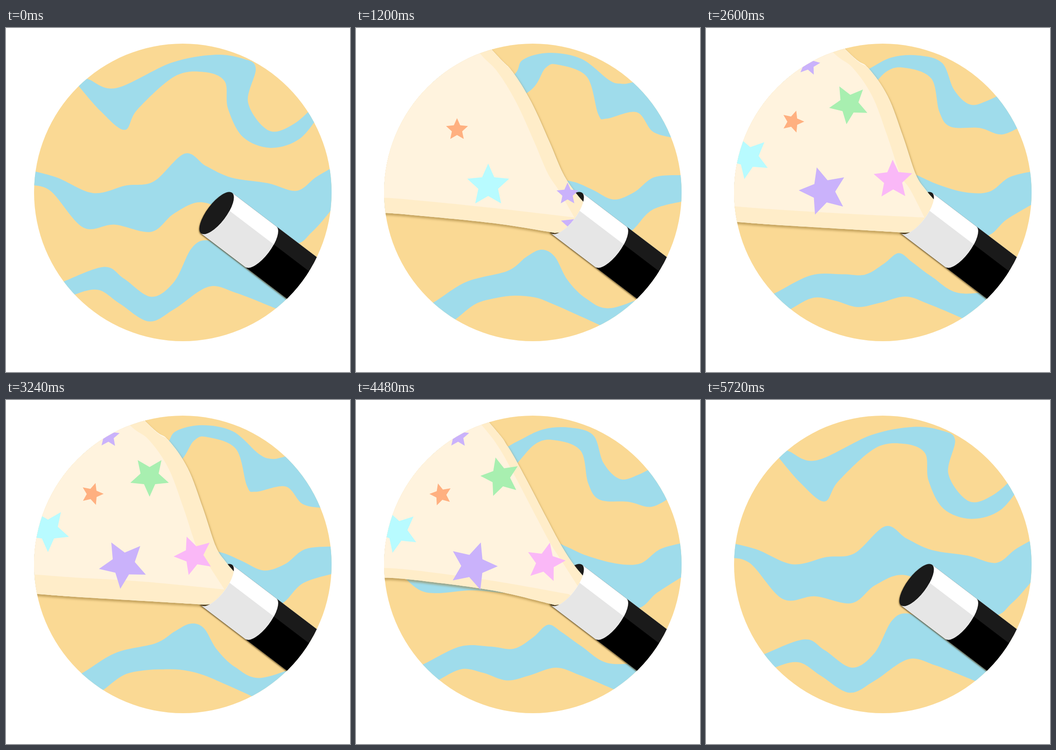
Animation, 748 px wide and 748 px high, one loop 5760 ms. Source, as an HTML page with a canvas:

```html
<!DOCTYPE html>
<html lang="en">
<head>
<meta charset="utf-8">
<title>Magic wand</title>
<style>
html, body { margin: 0; height: 100%; overflow: hidden; background: #fff; }
canvas { display: block; }
</style>
</head>
<body>
<canvas id="stage" width="748" height="748"></canvas>
<script>
const ctx = document.getElementById('stage').getContext('2d');
const LOOP = 5760, WAVE = 1920, STEP = 40;

const clamp = u => Math.min(1, Math.max(0, u));
const ease = u => { u = clamp(u); return u * u * (3 - 2 * u); };
const mix = (a, b, u) => a + (b - a) * u;
const mixPoint = (p, q, u) => p.map((v, i) => mix(v, q[i], u));
const mixPoints = (a, b, u) => a.map((p, i) => mixPoint(p, b[i], u));
const points = text => text.split(' ').map(p => p.split(',').map(Number));

// Eases one value through [time, value] keys.
function track(keys, t) {
  let value = keys[0][1];
  for (let i = 1; i < keys.length; i++) {
    const [from] = keys[i - 1], [to, next] = keys[i];
    value = mix(value, next, ease((t - from) / (to - from)));
  }
  return value;
}

// Adds a smooth curve through the points to the path.
function curve(path, pts, join) {
  path[join ? 'lineTo' : 'moveTo'](...pts[0]);
  for (let i = 0; i < pts.length - 1; i++) {
    const p = pts[i - 1] || pts[i], q = pts[i], r = pts[i + 1], s = pts[i + 2] || r;
    path.bezierCurveTo(q[0] + (r[0] - p[0]) / 6, q[1] + (r[1] - p[1]) / 6,
      r[0] - (s[0] - q[0]) / 6, r[1] - (s[1] - q[1]) / 6, ...r);
  }
}

// Rivers swing between two poses; each bank is a pair of curves.
const bank = (a, b) => [points(a), points(b)];
const rivers = [
  [bank('150,98 180,112 240,130 360,75 455,58 517,67 544,88 526,163 572,225 628,209 680,160',
        '150,55 190,102 245,160 340,105 363,69 420,54 490,67 550,113 575,121 602,118 680,95'),
   bank('150,117 205,180 258,222 284,178 365,106 430,96 475,116 482,175 515,238 575,262 640,240 690,175',
        '150,80 190,165 240,195 372,141 412,87 440,80 502,106 527,188 545,197 610,183 645,225 690,239')],
  [bank('40,306 110,325 190,360 260,343 320,334 388,272 435,300 490,325 570,337 632,354 675,324 720,297',
        '40,347 90,316 150,299 290,310 380,322 430,328 475,335 515,352 560,373 605,357 650,324 720,320'),
   bank('40,341 95,352 168,434 235,428 315,444 365,403 425,378 500,410 620,468 667,443 720,380',
        '40,395 85,398 135,403 270,400 350,395 425,400 500,430 560,450 600,440 645,395 720,375')],
  [bank('90,567 126,550 213,519 255,545 315,586 365,553 402,480 435,460 480,480 550,535 660,560',
        '130,612 168,597 240,552 330,528 370,498 403,482 432,497 460,548 500,588 555,609 660,570'),
   bank('120,598 150,578 200,569 247,600 310,639 365,612 440,562 500,575 587,609 650,635',
        '180,660 217,633 260,600 305,587 345,582 390,586 430,601 475,621 530,646 600,680')]
];

function drawRivers(t) {
  const p = (t - 60 + WAVE) % WAVE, rise = 1140;
  const swing = ease(p < rise ? p / rise : (WAVE - p) / (WAVE - rise));
  ctx.fillStyle = '#9fdceb';
  for (const [upper, lower] of rivers) {
    const path = new Path2D();
    curve(path, mixPoints(...upper, swing));
    curve(path, mixPoints(...lower, swing).reverse(), true);
    ctx.fill(path);
  }
}

// Silk: two edges from the mouth, taut or slack, joined by a ragged front.
const ROOT = [490, 425], MOUTH = [475, 412];
const upperEdge = bank('500,378 478,352 456,318 428,235 395,148 352,86 302,45',
                       '500,394 470,358 440,311 408,263 360,180 322,107 285,50');
const lowerEdge = bank('0,417 70,422 150,428 300,437 432,445',
                       '0,374 70,373 150,381 300,406 432,446');
const front = points('256,70 253,115 237,160 200,177 150,174 134,188 148,245 158,295 130,333 62,357');
const slackKeys = [[1200, 0.4], [2000, 0], [3240, 0], [4040, 1], [4920, 0.45]];
const insetKeys = [[1200, 33], [2000, 26], [3240, 42], [4040, 40], [4920, 2]];

function silkPath(reach, slack, inset) {
  const scale = (pts, k) => pts.map(p => mixPoint(ROOT, p, k));
  const toMouth = p => mixPoint(p, MOUTH, clamp(inset / 30));
  const upper = mixPoints(...upperEdge, slack)
    .map((p, i) => i ? [p[0] - inset, p[1]] : toMouth(p));
  const lower = mixPoints(...lowerEdge, slack)
    .map((p, i, all) => i < all.length - 1 ? [p[0], p[1] - inset] : toMouth(p));
  const k = Math.min(1, reach), path = new Path2D();
  curve(path, [...scale(upper, k), ...scale(front, reach), ...scale(lower, k)]);
  path.lineTo(490, 440);
  path.closePath();
  return path;
}

function shadow(color, blur, x, y) {
  Object.assign(ctx, { shadowColor: color, shadowBlur: blur, shadowOffsetX: x, shadowOffsetY: y });
}

function drawSilk(t) {
  const reach = Math.min(1.7, (t - 320) / 440, (5480 - t) / 560);
  if (reach <= 0) return;
  const slack = track(slackKeys, t);
  const outer = silkPath(reach, slack, 0);
  ctx.save();
  shadow('rgba(150,115,45,.5)', 4, 3, 5);
  ctx.fillStyle = '#fff8ea';
  ctx.fill(outer);
  shadow('transparent', 0, 0, 0);
  ctx.clip(outer);
  // The shifted fill leaves a bright rim on edges facing the light.
  ctx.translate(2, 3);
  ctx.fillStyle = '#ffedc9';
  ctx.fill(outer);
  ctx.translate(-2, -3);
  ctx.fillStyle = '#fff3de';
  ctx.fill(silkPath(reach * 0.87, slack, track(insetKeys, t)));
  ctx.restore();
}

// Stars fly from the tube to a resting place, sway there and return.
const TRAVEL = 600, INSIDE = [525, 450];
const star = (color, radius, home, away, out, back, ...turns) =>
  ({ color, radius, home, away, out, back,
     turns: [[1200, 0], ...[2000, 3240, 4040, 4920].map((t, i) => [t, turns[i]])] });
const stars = [
  star('#fab8f7', 44, [405, 323], [413, 357], 1260, 4940, 17, -21, 17, 8),
  star('#a8efb0', 44, [310, 165], [315, 168], 1180, 4900, -22, -36, -29, 0),
  star('#cab2fb', 54, [256, 353], [254, 362], 1080, 4920, -4, -29, 11, 26),
  star('#ffb080', 25, [190, 203], [184, 206], 710, 4810, 18, 17, -14, -16),
  star('#b8fbff', 48, [93, 280], [89, 286], 880, 4620, -16, -36, -22, -26),
  star('#cab2fb', 25, [224, 79], [222, 79], 1020, 4700, 18, 2, 2, 0)
];

function drawStar({ color, radius, home, away, out, back, turns }, t) {
  const way = ease((t - out) / TRAVEL) - ease((t - back) / TRAVEL);
  if (way <= 0) return;
  const rest = mixPoint(home, away, clamp((t - 2000) / 2800));
  const [x, y] = mixPoint(INSIDE, rest, way);
  const lift = 14 * Math.sin(Math.PI * way), turn = track(turns, t);
  ctx.beginPath();
  for (let i = 0; i < 10; i++) {
    const a = (turn + i * 36 - 90) * Math.PI / 180, r = radius * (i % 2 ? 0.47 : 1);
    ctx.lineTo(x + r * Math.cos(a), y - lift + r * Math.sin(a));
  }
  ctx.fillStyle = color;
  ctx.fill();
}

// Wand: local x runs along the tube, the mouth is at the origin.
const HALF = 55.5, RIM = 21, LENGTH = 330, RING = 121, SHINE = -21;
function inWand(draw) {
  ctx.save();
  ctx.translate(458, 402.5);
  ctx.rotate(0.65);
  draw();
  ctx.restore();
}
function band(x, top, color, from = Math.asin(top / HALF), to = Math.PI / 2, counter = false) {
  ctx.beginPath();
  ctx.ellipse(x, 0, RIM, HALF, 0, from, to, counter);
  ctx.lineTo(LENGTH, HALF);
  ctx.lineTo(LENGTH, top);
  ctx.fillStyle = color;
  ctx.fill();
}
function drawMouth() {
  shadow('rgba(70,50,10,.7)', 3, -1, 2);
  band(0, -HALF, '#1a1a1a', -Math.PI / 2, Math.PI / 2, true);
}
function drawTube() {
  band(0, -HALF, '#fff');
  band(0, SHINE, '#e6e6e6');
  band(RING, -HALF, '#1a1a1a');
  band(RING, SHINE, '#000');
}

function draw(t) {
  ctx.clearRect(0, 0, 748, 748);
  ctx.save();
  ctx.beginPath();
  ctx.arc(384.5, 357.5, 323.5, 0, Math.PI * 2);
  ctx.fillStyle = '#fad994';
  ctx.fill();
  ctx.clip();
  drawRivers(t);
  inWand(drawMouth);
  drawSilk(t);
  stars.forEach(s => drawStar(s, t));
  inWand(drawTube);
  ctx.restore();
}

const begin = performance.now();
function frame() {
  const t = (performance.now() - begin) % LOOP;
  draw(Math.floor(t / STEP) * STEP);
  requestAnimationFrame(frame);
}
frame();
</script>
</body>
</html>
```
